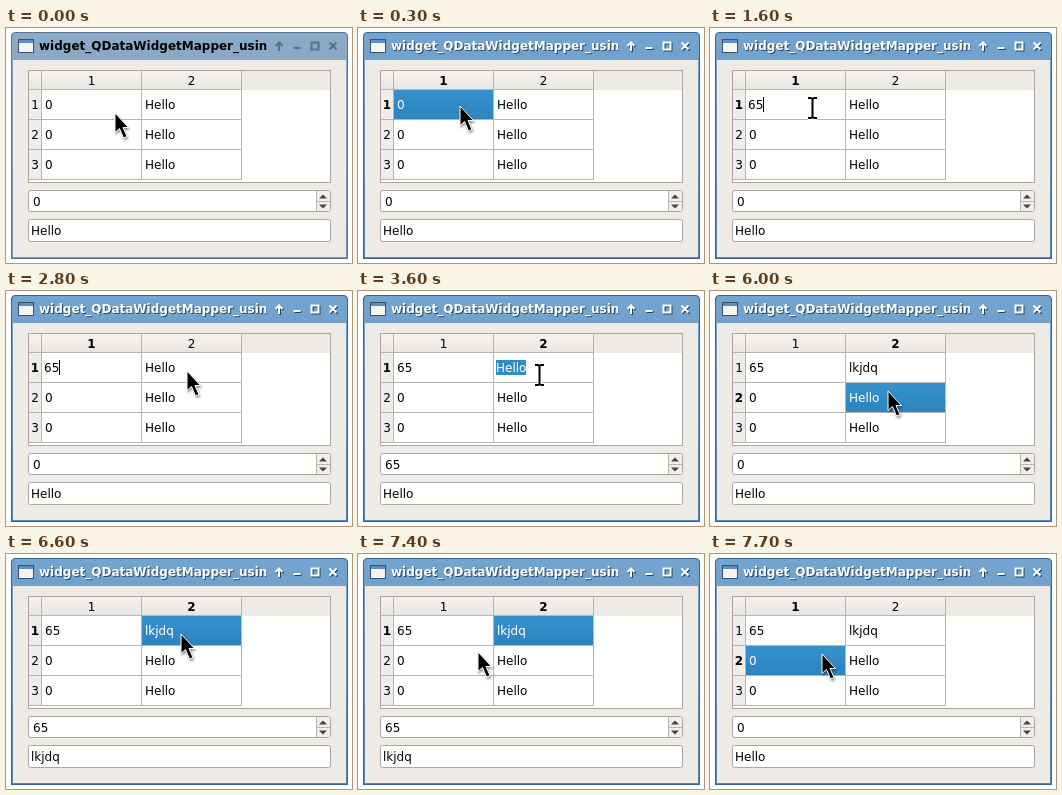
An HTML page that plays this animation: 346x235 px, repeating every 8 s.

```html
<!DOCTYPE html>
<html lang="en">
<head>
<meta charset="utf-8">
<title>Widget mapper</title>
<style>
html, body { margin: 0; width: 100%; height: 100%; overflow: hidden; background: #fff; }
svg { display: block; width: 346px; height: 235px; }
text { font: 12px "DejaVu Sans", sans-serif; fill: #000; white-space: pre; }
.bold, .title { font-weight: bold; }
.mid { text-anchor: middle; }
.line { fill: none; stroke: #b8b4b0; }
.field { fill: #fff; stroke: #aaa6a1; }
.title { fill: #000; }
.active .title { fill: #fff; text-shadow: 1px 1px 0 #2c4a68; }
.buttons { fill: none; stroke: #54738f; stroke-width: 2; }
.active .buttons { stroke: #fff; filter: drop-shadow(1px 1px 0 #24415e); }
.bar { fill: url(#dimBar); }
.active .bar { fill: url(#liveBar); }
.edge { fill: none; stroke: #5b7690; }
.active .edge { stroke: #38658f; }
</style>
</head>
<body>
<svg id="stage" viewBox="0 0 346 235">
  <defs>
    <linearGradient id="dimBar" x2="0" y2="1"><stop stop-color="#8cabc8"/><stop offset="1" stop-color="#7595b4"/></linearGradient>
    <linearGradient id="liveBar" x2="0" y2="1"><stop stop-color="#74a5d0"/><stop offset="1" stop-color="#5387b7"/></linearGradient>
    <linearGradient id="head" x2="0" y2="1"><stop stop-color="#f5f3f1"/><stop offset="1" stop-color="#e8e5e1"/></linearGradient>
    <linearGradient id="blue" x2="0" y2="1"><stop stop-color="#3592cd"/><stop offset="1" stop-color="#2d83bd"/></linearGradient>
    <clipPath id="titleClip"><rect x="30" y="5" width="230.5" height="26"/></clipPath>
  </defs>

  <path class="bar" d="M5 231V9q0-5 5-5H337q5 0 5 5V231Z"/>
  <rect x="7" y="32" width="333" height="197" fill="#eeebe7"/>
  <path class="edge" d="M5.5 230.5V9q0-4.5 4.5-4.5H337q4.500 0 4.500 4.500V230.500Z"/>
  <rect x="12.500" y="11.500" width="15" height="13" fill="#f4f4f2" stroke="#3c5166"/>
  <path d="M13 13.500H27" stroke="#5f8fbd" stroke-width="3"/>
  <g clip-path="url(#titleClip)"><text class="title" x="33" y="22">widget_QDataWidgetMapper_using</text></g>
  <g class="buttons">
    <path d="M273 23V15M269.500 18L273 14.500L276.500 18M287.500 20H294.500M305.500 14.500H312.500V21.500H305.500ZM323.500 14.500L330.500 21.500M330.500 14.500L323.500 21.500"/>
  </g>

  <rect class="field" x="22.500" y="42.500" width="302" height="112"/>
  <path fill="#eeebe7" d="M236 43H324V62H236Z"/>
  <path fill="url(#head)" d="M23 43H236V62H23Z"/>
  <path fill="#efedea" d="M23 62H35V152H23Z"/>
  <path class="line" d="M23 61.500H235.500M23 91.500H235.500M23 121.500H235.500M23 151.500H235.500M35.500 43V152M135.500 43V152M235.500 43V152"/>
  <g id="table"></g>

  <rect class="field" x="22.500" y="162.500" width="302" height="21" rx="2"/>
  <path fill="#f1efec" d="M311 163H323.500L324 164V183H311Z"/>
  <path class="line" d="M310.500 163V183M311 173.500H324"/>
  <path fill="#444" d="M313 170.500L317 166.500L321 170.500ZM313 176.500L317 180.500L321 176.500Z"/>
  <text id="spin" x="27" y="178"></text>
  <rect class="field" x="22.500" y="191.500" width="302" height="22" rx="2"/>
  <text id="field" x="25" y="207"></text>

  <g id="pointer">
    <path id="arrow" d="M0 0V19.500L4.500 15.500L8.500 25L12 23.500L8 14.500H13.500Z" fill="#000" stroke="#fff"
      style="filter: drop-shadow(1px 2px 1px rgba(0,0,0,.4))"/>
    <g id="beam" fill="none">
      <path d="M-4 -8H-1L.500 -7L2 -8H5M.500 -7V11M-4 12H-1L.500 11L2 12H5" stroke="#fff" stroke-width="4"/>
      <path d="M-4 -8H-1L.500 -7L2 -8H5M.500 -7V11M-4 12H-1L.500 11L2 12H5" stroke="#000" stroke-width="2"/>
    </g>
  </g>
</svg>
<script>
const LOOP = 8000;
const $ = id => document.getElementById(id);
const start = {
  active: false, cell: null, edit: null, marked: false, caret: false, beam: false,
  mouse: [109, 85], values: [["0", "Hello"], ["0", "Hello"], ["0", "Hello"]]
};

const move = (x, y) => ({ mouse: [x, y] });
const type = edit => ({ edit, marked: false, caret: true });
const open = edit => ({ edit, marked: true, caret: true });
const pick = (row, col) => ({ cell: [row, col], edit: null, beam: false });
const store = (...firstRow) => ({ values: [firstRow, ...start.values.slice(1)] });
const caret = on => ({ caret: on });
const beam = on => ({ beam: on });

// Each entry changes only the listed parts of the state from its time on.
const timeline = [
  [0, {}],
  [100, { active: true, ...pick(0, 0) }],
  [200, move(106, 82)],
  [300, move(102, 78)],
  [500, open("0")],
  [600, beam(true)],
  [1000, caret(false)],
  [1600, type("65")],
  [2200, { ...move(106, 76), ...caret(false) }],
  [2300, move(122, 81)],
  [2400, { ...move(138, 85), ...beam(false) }],
  [2700, { ...move(165, 84), ...caret(true) }],
  [2800, move(181, 80)],
  [3000, { ...move(181, 83), ...pick(0, 1), ...store("65", "Hello") }],
  [3100, open("Hello")],
  [3200, { ...move(181, 82), ...beam(true) }],
  [3600, caret(false)],
  [4200, caret(true)],
  [4600, type("l")],
  [4700, type("lkj")],
  [4800, type("lkjd")],
  [4900, type("lkjdq")],
  [5400, caret(false)],
  [5700, move(181, 87)],
  [5800, { ...move(180, 97), ...beam(false) }],
  [5900, { ...move(179, 100), ...pick(1, 1), ...store("65", "lkjdq") }],
  [6000, move(178, 100)],
  [6200, move(177, 94)],
  [6300, move(176, 86)],
  [6400, move(175, 81)],
  [6500, pick(0, 1)],
  [6600, move(175, 80)],
  [7100, move(166, 82)],
  [7200, move(150, 87)],
  [7300, move(133, 93)],
  [7400, move(120, 98)],
  [7500, move(113, 100)],
  [7600, pick(1, 0)],
  [7700, move(112, 100)]
];
let last = start;
const states = timeline.map(([, patch]) => last = { ...last, ...patch });

function add(tag, attrs, content = "") {
  const node = document.createElementNS("http://www.w3.org/2000/svg", tag);
  for (const key in attrs) node.setAttribute(key, attrs[key]);
  node.textContent = content;
  return $("table").appendChild(node);
}

const box = (x, y, width, height, fill) => add("rect", { x, y, width, height, fill });

function label(x, y, content, current) {
  add("text", { x, y, class: current ? "mid bold" : "mid" }, content);
}

function drawEditor(x, y, state) {
  const text = add("text", { x, y: y + 19 }, state.edit);
  const width = Math.round(text.getComputedTextLength());
  if (state.marked) {
    $("table").insertBefore(box(x, y + 7, width, 15, "#308cc6"), text);
    text.style.fill = "#fff";
  }
  if (state.caret) box(x + width, y + 7, 1, 15, "#000");
}

function draw(state) {
  const [row, col] = state.cell || [-1, -1];
  $("table").replaceChildren();
  [0, 1].forEach(c => label(85.5 + c * 100, 57, c + 1, c === col));
  state.values.forEach((cells, r) => {
    const y = 62 + r * 30;
    label(29, y + 19, r + 1, r === row);
    cells.forEach((value, c) => {
      const x = 36 + c * 100;
      const current = r === row && c === col;
      if (current && state.edit !== null) return drawEditor(x + 2, y, state);
      if (current) box(x, y, 99, 29, "url(#blue)");
      const text = add("text", { x: x + 3, y: y + 19 }, value);
      if (current) text.style.fill = "#fff";
    });
  });
  const [number, word] = state.values[Math.max(row, 0)];
  $("spin").textContent = number;
  $("field").textContent = word;
  $("stage").classList.toggle("active", state.active);
  $("pointer").setAttribute("transform", `translate(${state.mouse})`);
  $("arrow").style.display = state.beam ? "none" : "";
  $("beam").style.display = state.beam ? "" : "none";
}

let shown = -1;
function tick() {
  const time = performance.now() % LOOP;
  const index = timeline.findLastIndex(([at]) => at <= time);
  if (index !== shown) draw(states[shown = index]);
  requestAnimationFrame(tick);
}
tick();
</script>
</body>
</html>
```
